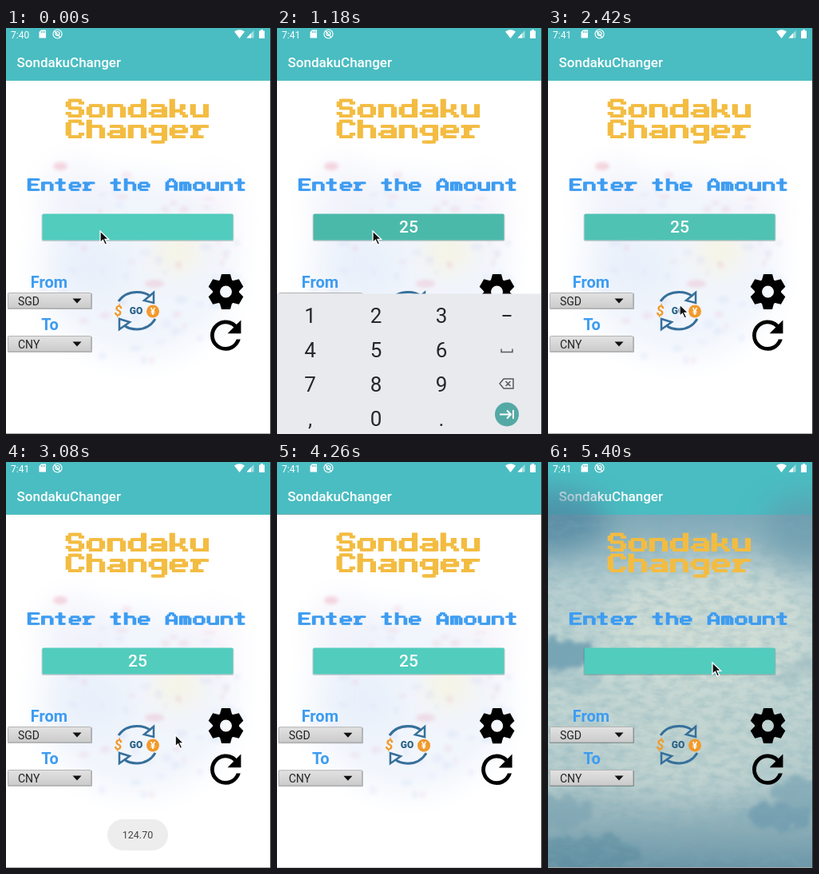
An HTML page for the animation above (5.42 s loop, 332 px wide and 508 px high).

```html
<!DOCTYPE html>
<html lang="en">
<head>
<meta charset="utf-8">
<title>SondakuChanger</title>
<style>
html, body { margin: 0; width: 100%; height: 100%; overflow: hidden; background: #fff; }
svg { display: block; width: 332px; height: 508px; font-family: Roboto, "Noto Sans", sans-serif; }
.pixel { fill: none; stroke-width: 1.2; stroke-linecap: square; stroke-linejoin: miter; }
.mid { text-anchor: middle; }
</style>
</head>
<body>
<svg id="stage" viewBox="0 0 332 508" xmlns="http://www.w3.org/2000/svg"></svg>
<script>
const LOOP = 5420;
const APP = "SondakuChanger";
const TEAL = "#4abdc2";

// Letters as strokes of a pen two cells wide and one cell high.
const GLYPHS = {
  A: "M2 0H3M1 1V1M4 1V1M0 2V6M5 2V6M0 4H5",
  B: "M0 0H4M0 0V6M0 6H4M0 3H4M5 1V2M5 4V5",
  C: "M1 0H4M0 1V5M1 6H4M5 1V1M5 5V5",
  E: "M0 0H5M0 0V6M0 6H5M0 3H4",
  S: "M1 0H4M0 1V2M5 1V1M1 3H4M5 4V5M0 5V5M1 6H4",
  a: "M1 2H4M5 3V6H1M1 4H4M0 5V5",
  c: "M1 2H5M0 3V5M1 6H5",
  d: "M5 0V6H1M1 2H4M0 3V5",
  e: "M1 2H4M0 3V5M5 3V4H0M1 6H4",
  g: "M1 2H5M0 3V4M1 5H4M5 2V7M1 8H4",
  h: "M0 0V6M0 2H4M5 3V6",
  i: "M2 0V0M1 2H2V6M0 6H4",
  k: "M0 0V6M0 4H3M4 2V3M4 5V5M5 6V6",
  m: "M0 2H4M0 2V6M2.5 3V6M5 3V6",
  n: "M0 2H4M0 2V6M5 3V6",
  o: "M1 2H4M0 3V5M5 3V5M1 6H4",
  r: "M0 2H1V6M0 6H3M3 2H5M2 3V3",
  s: "M1 2H5M0 3V3M1 4H4M5 5V5M0 6H4",
  t: "M2 0V6H4M0 2H4",
  u: "M0 2V5M1 6H5M5 2V6"
};

const pixelText = (text, x, y, cell, color) =>
  `<g class="pixel" role="img" aria-label="${text}" stroke="${color}" transform="translate(${x} ${y}) scale(${cell}) translate(.5 .5)">` +
  [...text].map((ch, i) => GLYPHS[ch] ? [0, 1].map(pen =>
    `<path d="${GLYPHS[ch]}" transform="translate(${i * 8 + pen})"/>`).join("") : "").join("") + "</g>";

const rect = (x, y, w, h, fill, extra = "") =>
  `<rect x="${x}" y="${y}" width="${w}" height="${h}" fill="${fill}" ${extra}/>`;
const label = (text, x, y, size, fill, extra = "") =>
  `<text x="${x}" y="${y}" font-size="${size}" fill="${fill}" ${extra}>${text}</text>`;
const blob = (x, y, rx, ry, fill, opacity) =>
  `<ellipse cx="${x}" cy="${y}" rx="${rx}" ry="${ry}" fill="${fill}" opacity="${opacity}"/>`;

function randomizer(seed) {
  return () => (seed = (seed * 16807) % 2147483647) / 2147483647;
}

function watercolor() {
  const rnd = randomizer(77);
  let specks = "";
  for (let i = 0; i < 70; i++) {
    const a = rnd() * 6.283, r = Math.sqrt(rnd());
    specks += blob(166 + Math.cos(a) * r * 135, 295 + Math.sin(a) * r * 125, 2 + rnd() * 6, 1.5 + rnd() * 4,
      ["#eaa4b8", "#b3cbf0", "#c0d2f3"][i % 3], 0.17);
  }
  return rect(0, 66, 332, 442, "#fff") +
    `<g filter="url(#soft)">${blob(165, 300, 125, 115, "#e6edfa", 0.55)}${blob(85, 215, 45, 50, "#ebeef9", 0.5)}` +
    `${blob(215, 280, 28, 25, "#faf3cd", 0.6)}${blob(110, 300, 45, 40, "#dde8fa", 0.4)}${blob(260, 230, 35, 50, "#f3eff9", 0.5)}</g>` +
    `<g filter="url(#smear)">${specks}${blob(68, 173, 9, 5, "#e98fa2", 0.35)}${blob(186, 320, 12, 5, "#e98fb0", 0.25)}</g>`;
}

function clouds() {
  return rect(0, 66, 332, 442, "url(#sky)") +
    `<g filter="url(#soft)">${blob(0, 75, 75, 40, "#4f86a0", 0.75)}${blob(325, 85, 55, 45, "#6596ab", 0.6)}` +
    `${blob(200, 200, 125, 75, "#d8e2d7", 0.7)}${blob(170, 350, 115, 70, "#c7d8d3", 0.6)}</g>` +
    `<g filter="url(#puff)">${blob(8, 243, 45, 20, "#5f95ab", 0.75)}${blob(30, 272, 42, 17, "#a9c5c8", 0.7)}` +
    `${blob(318, 262, 30, 14, "#a3bfc4", 0.6)}${blob(285, 442, 40, 18, "#6d9aae", 0.75)}${blob(315, 415, 28, 22, "#7da5b4", 0.7)}` +
    `${blob(15, 440, 40, 24, "#7aa2b1", 0.6)}${blob(45, 490, 75, 22, "#5a8a9f", 0.55)}</g>` +
    rect(0, 66, 332, 442, "#000", 'filter="url(#grain)"');
}

const header = () => rect(0, 0, 332, 66, TEAL) + rect(0, 66, 332, 1, "#000", 'opacity=".12"') +
  label(APP, 13.5, 49, 17, "#fff", 'font-weight="500"');

const spinner = (text, y) =>
  rect(2, y + 1, 106, 20, "#000", 'opacity=".28" rx="1"') +
  rect(2.5, y + 0.5, 104, 19, "url(#metal)", 'stroke="#b4b4b4" rx="1"') +
  label(text, 15, y + 15.5, 14, "#222") + `<path d="M83.500 ${y + 7.5}h11l-5.500 6z" fill="#111"/>`;

const gear = () => `<g transform="translate(275.500 330)"><circle r="12" fill="none" stroke="#000" stroke-width="9"/>` +
  [0, 60, 120, 180, 240, 300].map(a => `<path d="M-8 -13L-5.500 -22H5.500L8 -13z" transform="rotate(${a})"/>`).join("") + "</g>";

const refresh = () => `<path transform="translate(246.400 355.800) scale(2.400)" d="M17.650 6.350A8 8 0 1 0 19.730 14H17.650A6 6 0 1 1 16.220 7.780L13 11H20V4z"/>`;

const goButton = () => `<g fill="none" stroke="#36709b" stroke-width="3">
  <path d="M141 342Q149 330.500 164 330.500Q175 330.500 181 336"/><path d="M187 364Q179 377 164 377Q154 377 148 372"/>
  <path d="M173 341L185 331V344z" stroke-width="2.500"/><path d="M142 364V377L155 368z" stroke-width="2.500"/></g>
  <circle cx="184" cy="354.500" r="8" fill="#f19a2c"/>` +
  label("¥", 184, 359, 12, "#fff", 'class="mid" font-weight="700"') +
  label("$", 140.5, 359.5, 18, "#f19a2c", 'class="mid" font-weight="700" font-style="italic"') +
  label("GO", 163, 357.5, 12, "#286087", 'class="mid" font-weight="900"');

const converter = background => header() + background +
  pixelText(APP.slice(0, 7), 75, 89, 3.25, "#f3bc41") + pixelText(APP.slice(7), 75, 115, 3.25, "#f3bc41") +
  pixelText("Enter the Amount", 27, 188.5, 2.16, "#3d9cf1") +
  rect(44.5, 233, 241, 34, "#000", 'opacity=".16" rx="2"') +
  `<rect class="field" x="45.500" y="232.500" width="239" height="33" rx="1.500" fill="#51ccbd"/>` +
  label("", 165, 256, 21, "#fff", 'class="amount mid" font-weight="500"') +
  label("From", 54, 325, 20, "#3d9cf1", 'class="mid" font-weight="700"') + spinner("SGD", 331) +
  label("To", 55, 378, 20, "#3d9cf1", 'class="mid" font-weight="700"') + spinner("CNY", 385) +
  goButton() + gear() + refresh() +
  rect(0, 507, 332, 1, "#aaa");

const settings = () => rect(0, 0, 332, 508, "#fafafa") + header() +
  pixelText("Settings", 82, 125, 2.57, "#2f80d0") +
  pixelText("Change Background", 47, 275.5, 1.93, "#111") +
  `<rect id="box" x="26.500" y="280" width="14" height="14" rx="1.500" stroke-width="1.800"/>
   <path id="tick" d="M29.500 287l3 3 5.500-6" fill="none" stroke="#fff" stroke-width="2"/>`;

function keyboard() {
  const cols = [41.5, 124, 206];
  const keys = ["123", "456", "789", ",0."].map((row, r) => [...row].map((key, c) =>
    label(key, cols[c], 368 + r * 43, 26, "#25282b", 'class="mid"')).join("")).join("");
  return rect(0, 331, 332, 177, "#e8eaee") + keys + `<path d="M282.500 358.500h11" stroke="#25282b" stroke-width="2"/>
    <g fill="none" stroke="#55595e" stroke-width="1.500"><path d="M281 400v4h14v-4"/>
    <path d="M279 443.500l5-6h12v12h-12zM286.500 440.500l6 6m0-6l-6 6"/></g>
    <circle cx="288" cy="482" r="15" fill="#55a9a5"/>
    <path d="M279 482h14m-5-5l5 5-5 5M296 476.500v11" fill="none" stroke="#fff" stroke-width="2"/>`;
}

const popup = () => rect(7, 324, 60, 164, "#f4f4f4") + rect(7, 324, 60, 42, "url(#metal)") +
  ["SGD", "CNY", "USD", "MYR"].map((code, i) => label(code, 15, 352 + i * 41, 14, "#333")).join("");

const statusBar = () => label("", 6, 12.5, 12, "#fff", 'id="clock"') +
  `<path d="M41.500 5l2.500-2.500h6v10h-8.500z" fill="#fff"/><path d="M44.500 4v2m2-2v2m2-2v2" stroke="${TEAL}"/>
   <g fill="none" stroke="#fff" stroke-width="1.200"><circle cx="64.500" cy="7.500" r="5.500"/><circle cx="64.500" cy="7" r="2.500"/><path d="M61 4l7 8"/></g>
   <path d="M286 4.500Q292.500 0 299 4.500L292.500 13z" fill="#fff"/>
   <path d="M301.500 12.500L310.500 3V12.500z" fill="#fff" opacity=".5"/><path d="M301.500 12.500L307 6.500V12.500z" fill="#fff"/>
   <path d="M317 3.500h2v-1.500h3v1.500h2v9.500h-7z" fill="#fff"/>`;

const stage = document.getElementById("stage");
stage.innerHTML = `<defs>
  <linearGradient id="metal" x2="0" y2="1"><stop stop-color="#e2e2e2"/><stop offset="1" stop-color="#cbcbcb"/></linearGradient>
  <linearGradient id="sky" x2="0" y2="1"><stop stop-color="#80a9b8"/><stop offset=".2" stop-color="#b5cdd0"/>
    <stop offset=".45" stop-color="#c6d8d4"/><stop offset=".75" stop-color="#b4cbcc"/><stop offset="1" stop-color="#6b95a7"/></linearGradient>
  <filter id="soft" x="-30%" y="-30%" width="160%" height="160%"><feGaussianBlur stdDeviation="17"/></filter>
  <filter id="smear"><feGaussianBlur stdDeviation="2"/></filter>
  <filter id="shadow" x="-20%" y="-20%" width="140%" height="140%"><feGaussianBlur stdDeviation="1.500"/></filter>
  <filter id="puff"><feTurbulence type="fractalNoise" baseFrequency=".045" numOctaves="3" seed="8" result="noise"/>
    <feDisplacementMap in="SourceGraphic" in2="noise" scale="38" xChannelSelector="R" yChannelSelector="G"/><feGaussianBlur stdDeviation="2.500"/></filter>
  <filter id="grain" x="0" y="0" width="1" height="1"><feTurbulence type="fractalNoise" baseFrequency=".06 .12" numOctaves="4" seed="3"/>
    <feColorMatrix values="0 0 0 0 .2  0 0 0 0 .4  0 0 0 0 .47  .7 0 0 0 -.26"/></filter>
  <clipPath id="popupClip"><rect id="popupSize" x="7" y="324" width="60" rx="2"/></clipPath>
</defs>
<rect width="332" height="508" fill="#111"/>
<g id="main">${converter(watercolor())}</g>
<g id="popup"><rect id="popupShade" x="5.500" y="323" width="63" rx="3" fill="#333" opacity=".75" filter="url(#shadow)"/>
  <g clip-path="url(#popupClip)">${popup()}</g>
  <rect id="popupFrame" x="7" y="324" width="60" rx="2" fill="none" stroke="#777" stroke-width="2"/></g>
<g id="keyboard">${keyboard()}</g>
<g id="settings">${settings()}</g>
<g id="fresh">${converter(clouds())}</g>
<g id="toast">${rect(127, 447, 76, 39, "#ededed", 'rx="19.500"')}${label("124.70", 165, 471, 12.5, "#444", 'class="mid"')}</g>
${rect(0, 0, 332, 15, TEAL)}${statusBar()}${rect(331, 0, 1, 508, "#333")}
<path id="cursor" d="M0 0V14.500L3.400 11.300L6 17L8.600 15.800L6 10.400H10.600z" fill="#111" stroke="#fff" stroke-width="1.300"/>`;

const caret = document.createElementNS(stage.namespaceURI, "path");
caret.setAttribute("stroke", "#7fd8cc");
stage.querySelector("#main").append(caret);

const $ = selector => stage.querySelector(selector);
const clamp = v => Math.max(0, Math.min(1, v));
const ramp = (t, from, to) => clamp((t - from) / (to - from));
const smooth = v => v * v * (3 - 2 * v);
const easeOut = v => 1 - (1 - v) ** 2;
const set = (selector, attrs) => {
  for (const name in attrs) $(selector).setAttribute(name, attrs[name]);
};
const show = (selector, opacity) => set(selector, { opacity, display: opacity > 0 ? "inline" : "none" });
const scaled = s => `translate(166 254) scale(${s}) translate(-166 -254)`;

const POINTER = [
  [0, 118, 254], [400, 118, 254], [680, 120, 254], [1200, 120, 254], [1540, 69, 399], [1740, 69, 399],
  [1940, 42, 391], [2240, 42, 391], [2410, 165, 346], [2860, 165, 346], [3340, 272, 336], [3660, 272, 336],
  [3860, 34, 286], [4020, 34, 286], [4200, 344, 330], [4360, 344, 330], [4640, 270, 384], [4940, 270, 384], [5380, 206, 251]
];

function pointerAt(t) {
  const next = POINTER.findIndex(p => p[0] > t);
  if (next < 0) return POINTER[POINTER.length - 1].slice(1);
  const [t0, x0, y0] = POINTER[next - 1], [t1, x1, y1] = POINTER[next];
  const k = smooth(ramp(t, t0, t1));
  return [x0 + (x1 - x0) * k, y0 + (y1 - y0) * k];
}

function drawCaret(t) {
  const visible = t >= 400 && t < 1180 && (t < 560 || t % 1000 > 580);
  const x = t < 620 ? 165.5 : t < 860 ? 171.5 : 177.5;
  caret.setAttribute("d", visible ? `M${x} 238V262` : "M0 0");
}

function draw(t) {
  $("#clock").textContent = t < 1000 ? "7:40" : "7:41";
  $("#main .amount").textContent = t < 620 ? "" : t < 860 ? "2" : "25";
  const focused = t >= 380 && t < 1800;
  set("#main .field", { fill: focused ? "#4bb9aa" : t > 1800 && t < 2700 ? "#50c2b3" : "#51ccbd" });
  drawCaret(t);

  const keys = easeOut(ramp(t, 400, 540)) * (1 - ramp(t, 1180, 1300));
  show("#keyboard", keys > 0 ? 1 : 0);
  set("#keyboard", { transform: `translate(0 ${177 * (1 - keys)})` });

  const height = 164 * ramp(t, 1640, 1706);
  show("#popup", height > 0 ? 1 - ramp(t, 2080, 2180) : 0);
  set("#popupSize", { height });
  set("#popupFrame", { height });
  set("#popupShade", { height: height + 3 });

  const enter = ramp(t, 3540, 3680), leave = ramp(t, 4130, 4230);
  show("#settings", ramp(t, 3540, 3610) * (1 - leave));
  set("#settings", { transform: scaled(1 - 0.18 * (1 - enter) ** 2) });
  const settle = t >= 4130 ? 1 + 0.05 * (1 - ramp(t, 4130, 4290)) ** 2 : 1;
  const lift = t < 4130 ? -5 * enter : 0;
  set("#main", { transform: `translate(0 ${lift}) ${scaled(settle)}` });

  const checked = t >= 3940;
  set("#box", { fill: checked ? "#4ba9a5" : "none", stroke: checked ? "#4ba9a5" : "#666" });
  show("#tick", checked ? 1 : 0);

  show("#toast", ramp(t, 2880, 2980) * (1 - 0.75 * ramp(t, 3540, 3640)) * (1 - ramp(t, 3640, 3700)));

  show("#fresh", ramp(t, 4960, 5040));
  set("#fresh", { transform: scaled(1 - 0.15 * (1 - ramp(t, 4960, 5120)) ** 2) });

  const [x, y] = pointerAt(t);
  set("#cursor", { transform: `translate(${x} ${y})` });
}

const start = performance.now();
function tick() {
  draw(Math.max(0, performance.now() - start) % LOOP);
  requestAnimationFrame(tick);
}
tick();
</script>
</body>
</html>
```
